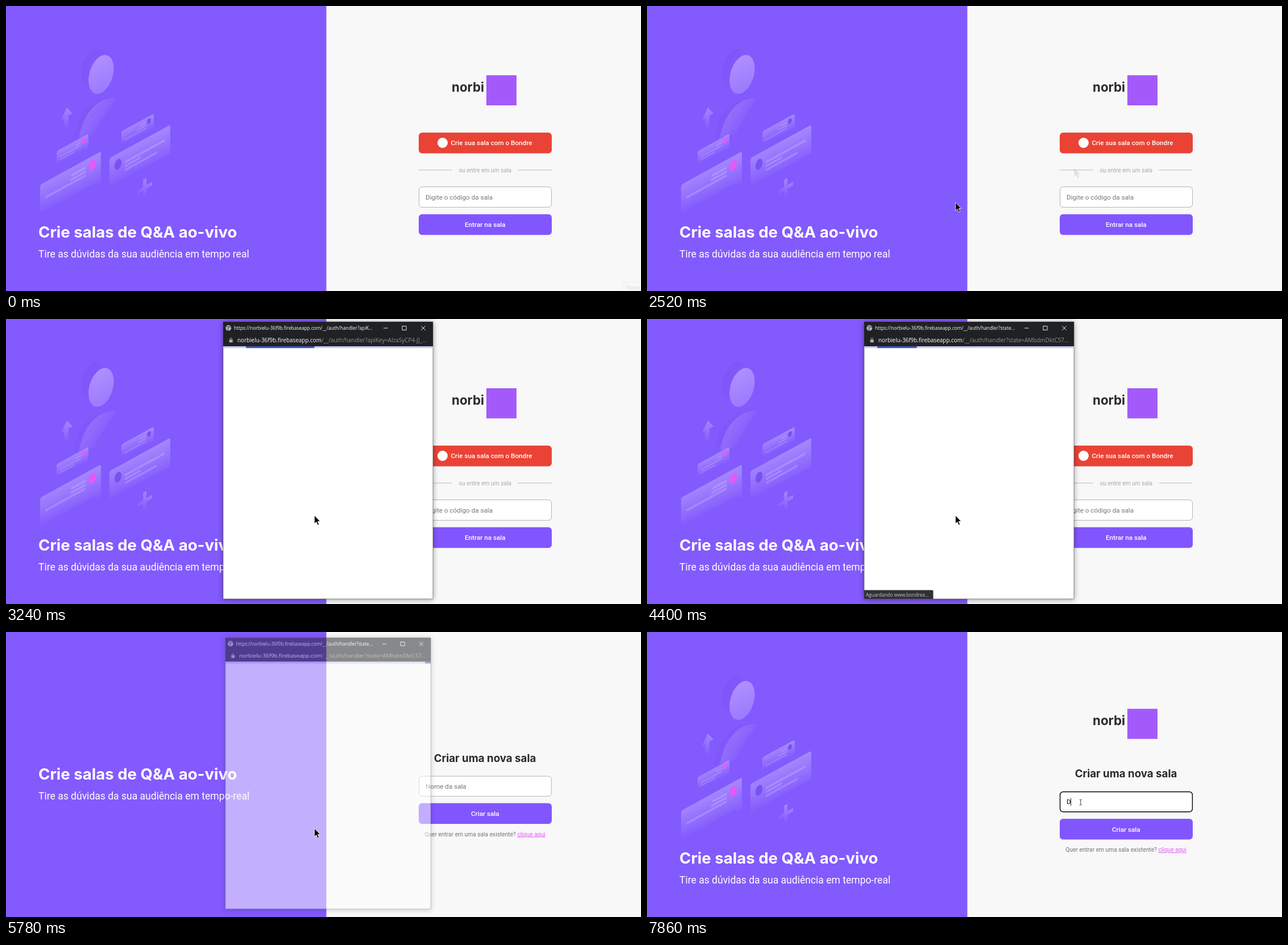
Animation of 1117 by 502 pixels, one loop 8000 ms. Source, as an HTML page:

```html
<!DOCTYPE html>
<html lang="pt">
<head>
<meta charset="utf-8">
<style>
html, body { margin: 0; width: 100%; height: 100%; overflow: hidden; background: #f8f8f8; }
svg { display: block; width: 1117px; height: 502px; }
text { font: 400 11.68px Roboto, sans-serif; white-space: pre; }
.big { font: 700 27.6px Inter, sans-serif; fill: #fff; }
.sub { font-size: 17.55px; fill: #fff; }
.head { font: 700 18.7px Inter, sans-serif; fill: #29292e; }
.name { font: 700 22.3px Inter, sans-serif; fill: #29292e; }
.btn { font-weight: 500; fill: #fff; }
.small { font-size: 10.22px; }
.win { font: 400 8.3px "Open Sans", "Noto Sans", sans-serif; fill: #fff; }
.url { font-size: 9.9px; }
.mid { text-anchor: middle; }
.box { fill: #fff; stroke: #b4b4bd; }
#popup { transform-origin: 566.5px 249px; }
#shadow { filter: drop-shadow(0 1px 5px rgba(0, 0, 0, .4)); }
</style>
</head>
<body>
<svg viewBox="0 0 1117 502">
  <defs>
    <linearGradient id="fade" x1=".55" y1="0" x2=".42" y2="1">
      <stop offset="0" stop-color="#fff" stop-opacity=".27"/>
      <stop offset=".9" stop-color="#fff" stop-opacity="0"/>
    </linearGradient>
    <linearGradient id="face" x1=".2" y1="0" x2=".7" y2="1">
      <stop offset="0" stop-color="#b092ff"/>
      <stop offset="1" stop-color="#9b79fe"/>
    </linearGradient>
    <linearGradient id="side" x1=".2" y1=".2" x2=".75" y2=".6">
      <stop offset="0" stop-color="#fff" stop-opacity=".18"/>
      <stop offset="1" stop-color="#fff" stop-opacity="0"/>
    </linearGradient>
    <linearGradient id="dark" x1="0" y1="0" x2="1" y2=".4">
      <stop offset="0" stop-color="#7548e8" stop-opacity=".3"/>
      <stop offset="1" stop-color="#7548e8" stop-opacity="0"/>
    </linearGradient>
    <path id="arrow" d="M0 0V14.6L3.4 11.5L5.8 17L8.2 16L5.8 10.6H10.2Z"/>
  </defs>

  <rect width="563.5" height="502" fill="#835afd"/>
  <g id="art">
    <ellipse cx="154" cy="109" rx="20" ry="35" transform="rotate(18 154 109)" fill="url(#dark)"/>
    <ellipse cx="167.3" cy="120.5" rx="20.5" ry="35.3" transform="rotate(17 167.3 120.5)" fill="url(#face)"/>
    <path d="M119 236C122 200 146 160 181 161L150 200Z" fill="url(#dark)"/>
    <path d="M129 232C133 196 160 157 194 163C184 178 166 200 156 226Z" fill="url(#side)"/>
    <path d="M107 179L117 189L110 193L109 218L102 222V198L96 202Z" fill="url(#fade)"/>
    <path d="M241 306L247 303V315L257 310V316L247 322V338L241 341V326L231 332V326L241 319Z" fill="url(#fade)"/>
  </g>
  <g id="left">
    <text class="big" x="57" y="408">Crie salas de Q&amp;A ao-vivo</text>
    <text class="sub" id="tagline" x="57" y="443"></text>
  </g>

  <g id="logo">
    <text class="name" x="784" y="151">norbi</text>
    <rect x="845" y="122" width="53" height="53" fill="#a45afb"/>
  </g>

  <g id="join">
    <rect id="red" x="726" y="223" width="234" height="36.5" rx="5.8"/>
    <circle cx="768" cy="241" r="9" fill="#fff"/>
    <text class="btn" x="782.5" y="245.2">Crie sua sala com o Bondre</text>
    <path d="M726 289H784.5M900.5 289H959.6" stroke="#a8a8b3" stroke-width=".8"/>
    <text class="small mid" x="842.8" y="292.5" fill="#a8a8b3">ou entre em um sala</text>
    <rect class="box" x="726.5" y="318.5" width="233" height="36" rx="5.5"/>
    <text x="738" y="341" fill="#757575">Digite o código da sala</text>
    <rect id="enter" x="726" y="366.8" width="234" height="36.5" rx="5.8"/>
    <text class="btn mid" x="842.8" y="389.2">Entrar na sala</text>
  </g>

  <g id="create">
    <text class="head mid" x="842.5" y="256.3">Criar uma nova sala</text>
    <rect class="box" id="room" x="726.6" y="281.5" width="232.8" height="35.300" rx="5.5"/>
    <text id="typed" x="738" y="303.3"></text>
    <path id="caret" stroke="#000" stroke-width=".9"/>
    <rect x="726" y="329" width="234" height="36.5" rx="5.8" fill="#8256fe"/>
    <text class="btn mid" x="842.8" y="351.8">Criar sala</text>
    <text class="small mid" x="842.5" y="387.2" fill="#737380">Quer entrar em uma sala existente? <tspan fill="#e559f9" text-decoration="underline">clique aqui</tspan></text>
  </g>

  <g id="record">
    <text class="small" x="1090" y="499" fill="#d9d9d9" style="font-size:8.6px">Gravar</text>
    <rect x="1086.5" y="486.5" width="34" height="20" fill="none" stroke="#efefef"/>
  </g>
  <use id="trail" href="#arrow" x="751.5" y="286" fill="#000" opacity=".09"/>

  <g id="popup">
    <rect id="shadow" x="382" y="5" width="369" height="488" fill="#fff" stroke="#555" stroke-width=".6"/>
    <rect x="382" y="5" width="369" height="43" fill="#202124"/>
    <circle cx="391.3" cy="15.7" r="5" fill="#b4b8bd"/>
    <path d="M387.5 14L390 13L392 15L390 17.5L391 20M393 11.5L393.5 13.5L396 15" fill="none" stroke="#4b4e52" stroke-width="1.2"/>
    <text class="win" x="401" y="19">https://norbielu-36f9b.firebaseapp.com/__/auth/handler?<tspan id="query"></tspan></text>
    <path d="M664 16H671.5M697 12.5H704V19.5H697ZM730.3 12.3L737.7 19.7M737.7 12.3L730.3 19.7" fill="none" stroke="#fff" stroke-width=".9"/>
    <path d="M394 37V35.3a1.7 1.7 0 0 1 3.4 0V37" fill="none" stroke="#aeb2b7"/>
    <rect x="392.7" y="36.5" width="6" height="4.8" rx=".6" fill="#aeb2b7"/>
    <text class="win url" x="407" y="41">norbielu-36f9b.firebaseapp.com<tspan id="path" fill="#8d9196"></tspan></text>
    <rect id="track" x="382" y="48" width="369" height="3.2" fill="#c5cbe9"/>
    <rect id="bar" y="48" height="3.2" fill="#3f51b5"/>
    <g id="status">
      <path d="M382 477.5H501.5a2 2 0 0 1 2 2V493H382Z" fill="#303135"/>
      <text class="win" x="385" y="488.5" style="fill:#c2c6ca">Aguardando www.bondrea...</text>
    </g>
  </g>

  <g id="mouse">
    <use id="pointer" href="#arrow" fill="#000" stroke="#fff" stroke-width=".8"/>
    <path id="hand" d="M-1.4 10V1.4a1.4 1.4 0 0 1 2.8 0V7L6 8.2q1.4.5 1.2 2L6.4 14.5L5 17.5H0L-4.6 11.5q.3-2.5 3.2-1.5z" fill="#fff" stroke="#000" stroke-width=".8"/>
    <path id="beam" d="M-2 -4.7H-.6L0 -4L.6 -4.7H2M0 -4V4M-2 4.7H-.6L0 4L.6 4.7H2" fill="none" stroke="#222" stroke-width=".9"/>
  </g>
</svg>
<script>
const $ = id => document.getElementById(id);
const show = (id, on) => $(id).style.display = on ? "" : "none";
const set = (id, attrs) => { for (const k in attrs) $(id).setAttribute(k, attrs[k]); };
const move = (id, x, y) => set(id, { transform: `translate(${x} ${y})` });
const ramp = (t, a, b) => Math.min(1, Math.max(0, (t - a) / (b - a)));

// Isometric message card: dot is [x, y, rx, ry, colour], bars are [from, to, y]
function card(x, y, w, h, tail, dot, bars, weight) {
  const foot = { left: `V${h}H9L0 ${h + 13}`, right: `V${h + 13}L${w - 12} ${h}H0`, none: `V${h}H0` }[tail];
  const lines = bars.map(([a, b, v]) => `M${a} ${v}H${b}`).join("");
  const [cx, cy, rx, ry, fill] = dot;
  $("art").insertAdjacentHTML("beforeend", `<g transform="matrix(1 -.55 0 1 ${x} ${y})">
    <path d="M0 3Q0 0 3 0H${w - 3}Q${w} 0 ${w} 3${foot}Z" fill="url(#fade)"/>
    <path d="${lines}" stroke="#fff" stroke-opacity=".17" stroke-width="${weight}"/>
    <ellipse cx="${cx}" cy="${cy}" rx="${rx}" ry="${ry}" fill="${fill}"/></g>`);
}
const pink = "#e559f9", plum = "#7b50f0";
card(89, 256, 56, 27, "none", [48, 7.4, 3.8, 4.5, pink], [[33, 43, 8], [5, 43, 13], [5, 31, 18]], 2.2);
card(60, 315, 107, 50, "right", [92, 16.1, 6.2, 9, pink], [[55, 80, 14], [53, 80, 21], [9, 80, 27.5]], 4);
card(203, 221, 57, 28, "none", [48.5, 8.4, 3.4, 4.7, plum], [[33, 43, 8], [28, 43, 13], [5, 43, 18]], 2.2);
card(182, 268, 107, 50, "left", [15, 19, 6.2, 9, plum], [[27, 97, 22], [27, 55, 29], [27, 83, 36]], 4);

const route = [
  [250, 1030, 490], [390, 860, 430], [460, 712, 405], [530, 704, 411], [800, 704, 411],
  [1160, 887, 241], [1299, 887, 241], [1300, 768, 240], [2030, 768, 240], [2240, 751, 286],
  [2480, 542.5, 346], [6430, 542.5, 346], [6990, 759, 299], [7250, 759, 299], [7530, 762.8, 300]
];
function mouseAt(t) {
  const i = route.findIndex(p => p[0] > t);
  if (i < 1) return (i ? route[route.length - 1] : route[0]).slice(1);
  const [t0, x0, y0] = route[i - 1], [t1, x1, y1] = route[i], p = ramp(t, t0, t1);
  return [x0 + (x1 - x0) * p, y0 + (y1 - y0) * p];
}

// Indeterminate two-bar loader with a 2 s cycle; returns [left, width] as fractions
function loader(ms) {
  const c = ms % 2000 / 2000;
  if (c < .5) return [.5 * c, 1.5 * c];
  if (c < .75) { const p = (c - .5) * 4; return [.25 + .75 * p, .75 * (1 - p)]; }
  const p = (c - .75) * 4;
  return [p, .25 * (1 - p)];
}

const PAGE = 5710, IMAGES = 5850, RELOAD = 4150, CLOSE = 5640;

function drawPages(t) {
  const next = t >= PAGE, loaded = !next || t >= IMAGES, focus = t >= 6990, typed = t >= 7860;
  show("art", loaded);
  show("logo", loaded);
  show("join", !next);
  show("create", next);
  move("left", 0, loaded ? 0 : -148);
  move("logo", 0, next ? 13.3 : 0);
  move("create", 0, loaded ? 0 : -27.5);
  $("tagline").textContent = "Tire as dúvidas da sua audiência em tempo" + (next ? "-" : " ") + "real";
  $("room").style.stroke = focus ? "#000" : "";
  $("room").style.strokeWidth = focus ? 1.4 : "";
  $("typed").textContent = typed ? "D" : "Nome da sala";
  set("typed", { fill: typed ? "#111" : "#757575" });
  set("caret", { d: `M${typed ? 745.6 : 738.5} 292.5V306` });
  show("caret", focus && (t < 7530 || typed));
  show("record", t < 70);
  show("trail", t >= 2300 && t < 2700);
}

function drawPopup(t) {
  const open = ramp(t, 2590, 2780), close = ramp(t, CLOSE, 5930);
  show("popup", open > 0 && close < 1);
  $("popup").style.opacity = open * (1 - close);
  $("popup").style.transform = `scale(${.92 + .08 * open - .043 * close})`;
  const again = t >= RELOAD;
  $("query").textContent = again ? "state..." : "apiK...";
  $("path").textContent = "/__/auth/handler?" + (again ? "state=AMbdmDktC57..." : "apiKey=AIzaSyCP4-JJ_...");
  const start = again ? RELOAD : 2806;
  const [left, width] = loader(Math.max(0, Math.min(t, CLOSE - 8) - start));
  set("bar", { x: 382 + 369 * left, width: 369 * width });
  show("track", t >= 2806);
  show("status", t >= 3450 && t < 4900);
}

function drawMouse(t) {
  const [x, y] = mouseAt(t), first = t < PAGE;
  const over = (top, bottom) => x > 726 && x < 960 && y > top && y < bottom;
  const onRed = first && over(223, 260), onEnter = first && over(366, 403);
  const onField = first ? over(318, 355) : over(281, 317);
  set("red", { fill: onRed ? "#d43c30" : "#ea4335" });
  set("enter", { fill: onEnter ? "#7651e4" : "#8256fe" });
  show("mouse", t >= 250);
  show("hand", onRed || onEnter);
  show("beam", onField);
  show("pointer", !onRed && !onEnter && !onField);
  move("mouse", x, y);
}

function frame() {
  const t = performance.now() % 8000;
  drawPages(t);
  drawPopup(t);
  drawMouse(t);
  requestAnimationFrame(frame);
}
frame();
</script>
</body>
</html>
```
